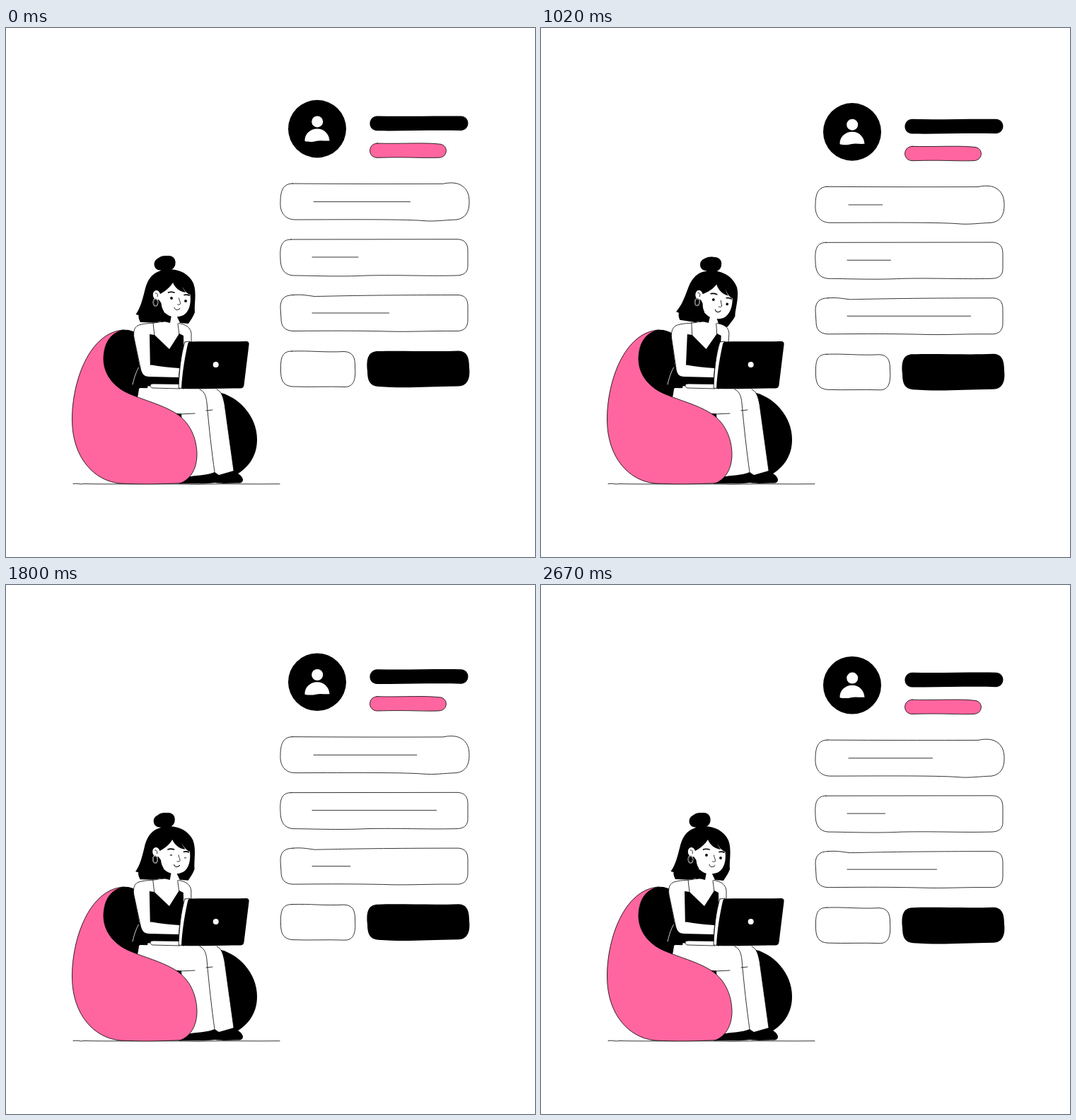
Animation of 748x748 px, one loop 2.7 s. Source, as an HTML page with a canvas:

```html
<!DOCTYPE html>
<html lang="en">
<head>
<meta charset="utf-8">
<title>Profile form</title>
<style>
html, body { margin: 0; width: 100%; height: 100%; overflow: hidden; background: #fff; }
canvas { display: block; width: 748px; height: 748px; }
</style>
</head>
<body>
<canvas id="stage" width="748" height="748"></canvas>
<script>
const ctx = document.getElementById('stage').getContext('2d');
const LOOP = 2700, STEP = 30;
const BLACK = '#000', WHITE = '#fff', PINK = '#ff66a0';
const THIN = 0.8;

function shape(d, fill, stroke, width = THIN) {
  const path = new Path2D(d);
  if (fill) {
    ctx.fillStyle = fill;
    ctx.fill(path);
  }
  if (stroke) {
    ctx.strokeStyle = stroke;
    ctx.lineWidth = width;
    ctx.stroke(path);
  }
}

function oval(x, y, rx, ry, fill, stroke, width = THIN) {
  ctx.beginPath();
  ctx.ellipse(x, y, rx, ry, 0, 0, Math.PI * 2);
  if (fill) {
    ctx.fillStyle = fill;
    ctx.fill();
  }
  if (stroke) {
    ctx.strokeStyle = stroke;
    ctx.lineWidth = width;
    ctx.stroke();
  }
}

function within(transform, draw) {
  ctx.save();
  transform();
  draw();
  ctx.restore();
}

// Eased interpolation between [time, value] keys.
function keyed(keys, t) {
  const i = keys.findIndex(k => k[0] > t);
  if (i < 0) return keys[keys.length - 1][1];
  const [t0, a] = keys[i - 1], [t1, b] = keys[i];
  const u = (t - t0) / (t1 - t0);
  return a + (b - a) * u * u * (3 - 2 * u);
}

const LEAN = [[0, 0], [250, 0], [660, 1], [1100, 1], [1650, -0.06], [2500, 0]];
const BLINK = [[0, 1], [1710, 1], [1800, 0.3], [1890, 1]];

// Field lines: start x, y, middle of the end point, cosine and sine parts of its swing.
const FIELDS = [
  [435, 245.7, 542.5, 29, 61],
  [433, 324, 544, -46, 48],
  [433, 403, 542.5, -1, -65]
];

function drawForm(t) {
  const turn = t / LOOP * Math.PI * 2;
  within(() => ctx.translate(0, 6.2 * Math.sin(turn)), () => {
    oval(440, 142.6, 41, 40.8, BLACK);
    oval(440.2, 132.4, 8, 8, WHITE);
    shape('M422.5 160 C422 150 430 142.5 440 142.5 C450 142.5 457 150 457.5 159.5 C450 160 445 158.5 438 160 C432 161.5 428 161 422.5 160Z', WHITE);

    shape('M525 124.5 C560 125.5 600 124 643 124.5 C657 125 657 144.5 643 145 C600 144 560 146 525 145.3 C511 145 511 125 525 124.5Z', BLACK);
    shape('M525 163 C550 164 585 162 606 163.5 L614 164.2 C626 166 625 183 612 183.3 C590 184.3 570 182 525 183.4 C511 183 511 163.5 525 163Z', PINK, BLACK);

    shape('M405 220 C480 220.5 560 220.5 618 220.3 C626 218.5 636 218 643 222 C652 227 655 235 655 246 C655 260 650 269 637 271 C620 271.5 605 274 590 272.5 C560 270 460 271 409 271 C394 271 387 260 388 246 C388 230 392 220 405 220Z', WHITE, BLACK);
    shape('M403 299 L638 298.7 C648 299 653 304 653 315 L653 336 C653 346 647 350 636 350 C590 351 560 349 510 350 C470 352 430 350 406 350 C393 349 388 340 388 326 C387 310 389 299 403 299Z', WHITE, BLACK);
    shape('M406 377.5 C418 376.5 425 378 436 379.5 C450 379.5 500 377.5 640 377.5 C650 378.5 653 384 653 394 L653 413 C653 424 647 429 636 428.5 C600 428 570 430 540 429 C500 428 460 428 406 428.5 C394 428 389 422 389 411 L388 395 C388 384 393 377.5 406 377.5Z', WHITE, BLACK);
    shape('M404 457 C430 456 450 459 478 457.5 C490 458 494 465 493.5 480 C495 500 490 508 478 507.5 C455 506.5 430 508 405 507 C392 506 388 498 388.5 482 C388 464 392 457 404 457Z', WHITE, BLACK);
    shape('M526 457 C560 456 605 458 640 456.5 C652 457 655 466 655 480 C657 498 651 506 640 506.5 C600 507 575 509 545 508 L526 507 C514 506 511 498 511 485 C509 466 513 457 526 457Z', BLACK);

    for (const [x, y, mid, c, s] of FIELDS) {
      const end = mid + c * Math.cos(turn * 2) + s * Math.sin(turn * 2);
      shape(`M${x} ${y} H${end}`, null, BLACK);
    }
  });
}

function drawSeat() {
  shape('M95 644.5 C101 643 104 646 111 644.5 C150 645.5 220 644 270 645.3 C310 644 350 645.3 387 644.7', null, BLACK);
  shape('M304 516 C328 522 355 548 355 582 C355 607 341 624 321 634 L300 634Z', BLACK);
  shape('M165 427 C172 426 180 428 186 432 L205 470 L200 510 L188 510 L186 530 L150 520 C136 500 136 480 138 465 C140 440 150 430 165 427Z', BLACK);

  // Trousers and shoes
  shape('M244 644.5 L256 632 L295 627 L302 630 L321 624 C326 630 333 631 335 638 C335 642 333 643.5 329 643.5 C318 643 308 645 296 643 C280 645 262 644 244 644.5Z', BLACK);
  shape('M189 509 L298 511 C305 514 307 522 309 532 L322 626 L301 632 L295 628 C284 633 270 632 256 635 L225 600 L200 540 L186 522Z', WHITE);
  shape('M298 511 C305 514 307 522 309 532 L322 626', null, BLACK);
  shape('M274 511 C281 514 283 521 284 530 C287 565 291 600 295 628', null, BLACK);
  shape('M246 546 L267 545 M283 541 L292 540', null, BLACK);
  shape('M232 544 L248 545.5 L249 562Z', BLACK);

  shape('M166 427 C118 430 93 500 93.5 555 C94 608 125 641 162 644 C190 645.5 222 645 247 643.5 C263 637 270.5 620 270 601 C269 575 257 555 239 544 C219 532 197 527 175 517.5 C150 507 137 487 138 465 C139 445 148 431 166 427Z', PINK, BLACK);
}

function drawHair() {
  oval(225.5, 333, 14, 11, BLACK);
  oval(230, 330.5, 9.5, 8.5, BLACK);
  oval(217, 334, 7.5, 8.5, BLACK);
  shape('M214 345 C232 337 256 342 265 361 C270 374 266 391 267 402 C265 408 261 413 258 418 L246 417 L238 400 L224 398 L221 417 L190 416 C188 412 187 409 187.5 406 L183.5 405 C190 396 193 384 196 372 C199 358 205 349 214 345Z', BLACK);
}

function drawFace(open) {
  shape('M236 360 C238 366 245 373 254 374 C252 371 250 368 249 365 C252 371 256 376 260.5 377 C262 390 259 401 251 406 C242 410.5 229 409 223.5 401 C221 397 220 394 219.5 389 L216 384 C210 386 207 380 208 375 C210 369 216 370 218 376 C224 373 232 367 236 360Z', WHITE);
  shape('M211 375 C214 374 215 377 214 380', null, BLACK);
  oval(211.5, 388, 3.2, 5, null, WHITE, 1.6);
  oval(211.5, 388, 3.2, 5, null, BLACK, 0.7);
  shape('M229.5 374 C232 373 235 373 238 374 M252 377.5 C254 377 257 377 259 378', null, BLACK, 1.7);
  oval(234, 382, 1.9, 1.9 * open, BLACK);
  oval(254, 386, 1.9, 1.9 * open, BLACK);
  shape('M244.5 382 C245 386 247 388 246.5 390 C246 391.5 244 391.5 242.5 391', null, BLACK);
  shape('M238 395.5 C239 399 243 400 246 396.5', null, BLACK, 1);
}

function drawTorso() {
  shape('M221 404 L220.5 414 C211 418 198 417 190 419.5 C182 421 179.5 428 181 438 L191 488 L255 488 L262 444 L262 432 C261 423 254 419 244 417.5 L236 416 L234 404Z', WHITE);
  shape('M220.5 415 C211 418 198 417 190 419.5 C182 421 179.5 428 181 438 L191 485 M244 417.5 C254 419 261 423 262 432 L262 444', null, BLACK);
  shape('M218 400 L234 406 L232 417 C228 415.5 223 415 219 416Z', BLACK);
  shape('M203 433 L210 434 L231 454 L245 432 L251 435 L252 486 L204 486Z', BLACK);
  shape('M208 417 L210 435 M243 418 L245 434', null, BLACK);
}

function drawDesk(lean) {
  shape('M188 479 L179 506 L248 507 L250 478Z', BLACK);
  shape('M187.5 480 C183 488 181 496 179 504', null, WHITE);
  // Forearm
  shape(`M${190 + lean} 478 L206 476.5 C218 479 231 480 245 481 L244 494 L203 493 C195 493 191.5 489 ${190 + lean} 478Z`, WHITE);
  // Laptop
  shape('M207 503 L246 503.5 L246 510 L207 509 C203 508 203 503 207 503Z', WHITE, BLACK);
  shape('M253 444 L260 443 L252 510 L244 509 C245 486 247 462 253 444Z', WHITE, BLACK);
  shape('M261 443.5 C288 442.5 315 444 339 443 C343 443 344 445 343.5 448 L336.5 505 C336 508 334.5 509.5 331 509.5 C304 509 276 511 248 510 C249 488 253 465 257 447 C257.5 444.5 259 443.5 261 443.5Z', BLACK);
  oval(296.7, 476, 4, 4, WHITE);
}

function drawPerson(t) {
  const lean = keyed(LEAN, t);
  const tilt = () => {
    ctx.translate(235 + 5.5 * lean, 420 + 2 * lean);
    ctx.rotate(0.115 * lean);
    ctx.translate(-235, -420);
  };
  const bend = () => {
    const k = 0.062 * lean;
    ctx.transform(1, 0, -k, 1, 495 * k, 0);
  };
  within(tilt, drawHair);
  within(bend, drawTorso);
  within(tilt, () => drawFace(keyed(BLINK, t)));
  drawDesk(lean);
}

function frame() {
  const clock = Math.floor(performance.now() % LOOP / STEP) * STEP;
  // The motion rests for one step late in the loop.
  const t = clock >= 1980 ? clock - STEP : clock;
  ctx.fillStyle = WHITE;
  ctx.fillRect(0, 0, 748, 748);
  ctx.lineCap = ctx.lineJoin = 'round';
  drawSeat();
  drawPerson(t);
  drawForm(t);
  requestAnimationFrame(frame);
}
frame();
</script>
</body>
</html>
```
